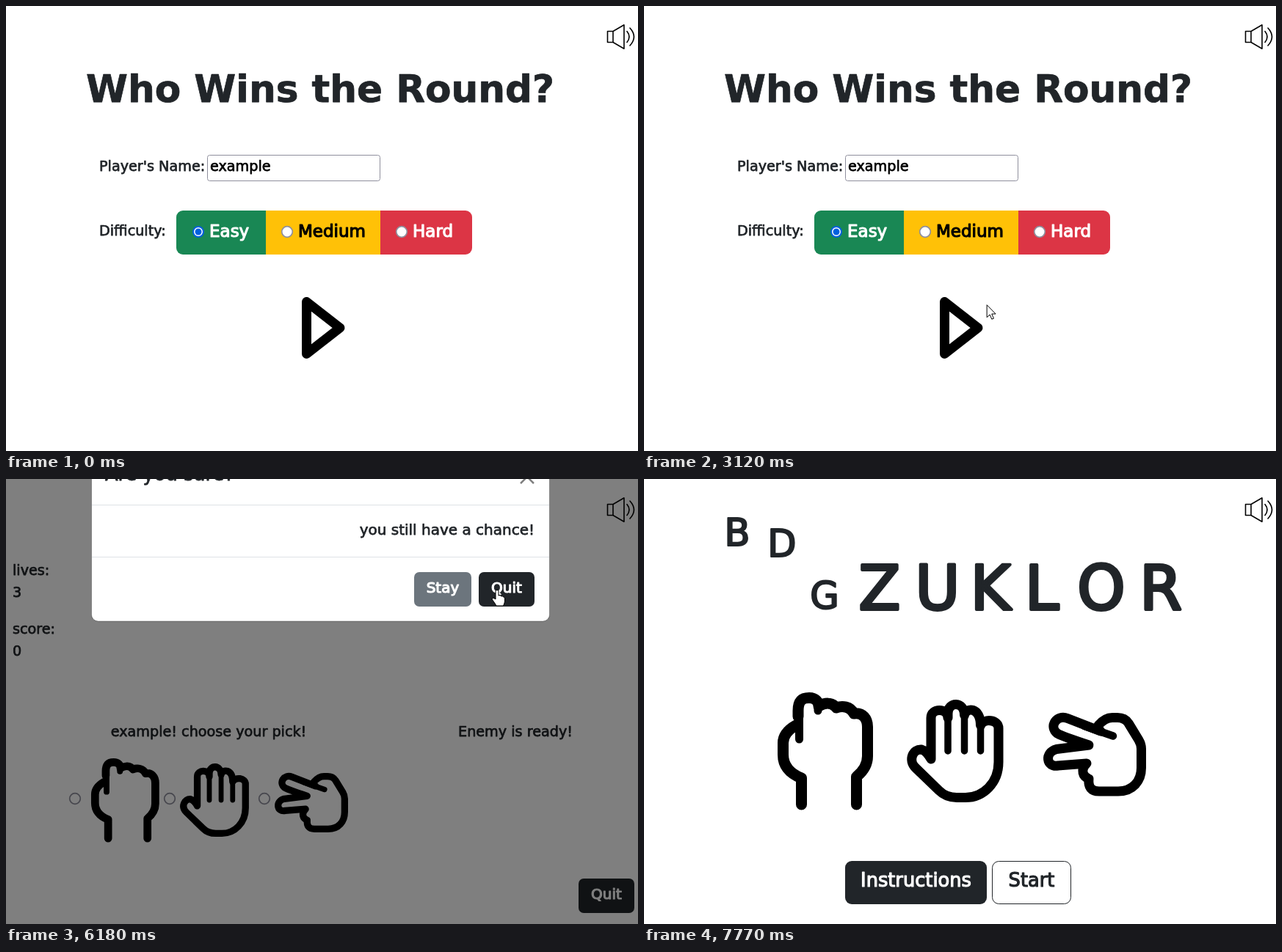
Write an HTML page that moves like this. It is 861x607 px and loops after 7.84 s.

```html
<!DOCTYPE html>
<html lang="en">
<head>
<meta charset="utf-8">
<title>Hand game</title>
<style>
  html, body { margin: 0; height: 100%; overflow: hidden; background: #fff; }
  svg { display: block; width: 861px; height: 607px; }
  text {
    font: 19.2px "DejaVu Sans", sans-serif; fill: currentColor; stroke: currentColor;
    stroke-width: .75; stroke-linejoin: round; color: #212529;
  }
  .mid { text-anchor: middle; }
  .end { text-anchor: end; }
  .title { font-size: 51.7px; font-weight: bold; }
  .label { font-size: 23px; stroke-width: 1.2; }
  .wide { font-size: 25.7px; stroke-width: 1.2; }
  .heading { font-size: 25.7px; }
  .bold { font-size: 20px; stroke-width: 1.2; }
  .small { font-size: 51px; stroke-width: 2.2; }
  .big { font-size: 83px; stroke-width: 4; }
  .light { color: #fff; }
  .ui { font: 14px "Open Sans", sans-serif; stroke-width: 0; color: #fbfbfe; }
  .line { fill: none; stroke: #000; stroke-linecap: round; stroke-linejoin: round; }
  .radio { fill: #fff; stroke: #8f8f9d; stroke-width: 1.7; }
</style>
</head>
<body>
<svg viewBox="0 0 861 607">
  <defs>
    <g id="fist" class="line" stroke-width="15">
      <path d="M214.5 444V408Q189.5 398 189.5 376V360Q189.5 346 207 336"/>
      <path stroke-width="11" d="M211.5 355V325M237 316V306"/>
      <path d="M210 324V316C210 303 215 298.5 225 298.5C234 298.5 238 304 238 310C246 305 256 304 262 312C270 309 281 310 286 320C298 318 304.5 327 304.5 338V378Q304.5 394 289.5 406V444"/>
    </g>
    <g id="palm" class="line" stroke-width="13">
      <path stroke-width="9.5" d="M414 324V371M436.5 322V371M458.5 330V371"/>
      <path d="M391 382V326C391 312 414 312 414 326V320C414 303 436.5 303 436.5 322C439 311 458.5 311 458.5 336C463 326 483 328 483 340V386C483 415 462 434.5 438 434.5H426C416 434.5 409 432 402 425L370 394C359 383 367 368 378 369Q385 371 391 382Z"/>
    </g>
    <g id="scissors" class="line" stroke-width="13">
      <path stroke-width="10.5" d="M639 350.5L600 337"/>
      <path d="M622 344L577 326.5C562 320.5 551 338 563 347Q567 350 606 363L562 368.5C545 373 548 394 564 391L603 388C594 397 598 406 606 409C605 420 609 426 620 426H646C666 426 677.5 412 677.5 394V368Q677.5 362 674 356L660 333Q655 325.5 645 325.5H638Q628 325.5 619 336"/>
    </g>
    <filter id="shadow" x="-10%" y="-20%" width="120%" height="150%">
      <feDropShadow dx="0" dy="2" stdDeviation="7" flood-opacity=".3"/>
    </filter>
    <clipPath id="group"><rect x="232" y="279" width="403" height="60" rx="9"/></clipPath>
  </defs>

  <g id="setup">
    <text class="title mid" x="428" y="131">Who Wins the Round?</text>
    <text x="127" y="225">Player's Name:</text>
    <rect x="274.5" y="203.5" width="235" height="35" rx="3" fill="#fff" stroke="#8f8f9d"/>
    <text x="278" y="225" style="color:#000">example</text>
    <text x="127" y="313">Difficulty:</text>
    <g clip-path="url(#group)">
      <rect id="easy" x="232" y="279" width="122" height="60"/>
      <rect id="medium" x="354" y="279" width="156" height="60"/>
      <rect id="hard" x="510" y="279" width="125" height="60"/>
    </g>
    <circle cx="262" cy="308" r="7" fill="#fff" stroke="#0060df" stroke-width="2"/>
    <circle cx="262" cy="308" r="4.5" fill="#0060df"/>
    <circle class="radio" cx="383" cy="308" r="7.3"/>
    <circle class="radio" cx="539" cy="308" r="7.3"/>
    <text class="label light" x="277" y="315">Easy</text>
    <text class="label" x="398" y="315" style="color:#000">Medium</text>
    <text class="label light" x="554" y="315">Hard</text>
    <path class="line" stroke-width="13" d="M409.5 403.5V474.5L455 439Z"/>
  </g>

  <g id="game">
    <text x="9" y="131">lives:</text>
    <text x="9" y="161">3</text>
    <text x="9" y="211">score:</text>
    <text x="9" y="241">0</text>
    <text class="mid" x="276" y="351">example! choose your pick!</text>
    <text class="mid" x="694" y="351">Enemy is ready!</text>
    <circle class="radio" cx="94" cy="436" r="7.3"/>
    <circle class="radio" cx="223" cy="436" r="7.3"/>
    <circle id="pick" class="radio" cx="352" cy="436" r="7.3"/>
    <use href="#fist" transform="translate(-14 173.2) scale(.714)"/>
    <use href="#palm" transform="translate(-18.6 173.2) scale(.714)"/>
    <use href="#scissors" transform="translate(-22.4 173.2) scale(.714)"/>
    <rect id="quit" x="780" y="545" width="76" height="47" rx="7"/>
    <text class="bold light mid" x="818" y="573">Quit</text>
  </g>

  <g id="home">
    <g id="letters">
      <text class="small mid" x="127" y="177">B</text>
      <text class="small mid" x="188" y="177">D</text>
      <text class="small mid" x="246" y="177">G</text>
    </g>
    <g id="word"></g>
    <use href="#fist"/><use href="#palm"/><use href="#scissors"/>
    <rect x="274" y="521" width="193" height="59" rx="9" fill="#212529"/>
    <text class="wide light mid" x="370.5" y="556">Instructions</text>
    <rect x="474.5" y="521.5" width="107" height="58" rx="9" fill="#fff" stroke="#212529"/>
    <text class="wide mid" x="528" y="556">Start</text>
  </g>

  <g class="line" stroke-width="1.6">
    <path d="M819.5 34.5H827V49.5H819.5ZM827 34.5L842 25.8V58.2L827 49.5"/>
    <path d="M846 34.5Q852 42 846 49.5M850 30Q861 42 850 54"/>
  </g>

  <rect id="shade" width="861" height="607"/>

  <g id="alert">
    <rect x="173" y="296" width="510" height="164" rx="9" fill="#42414d" filter="url(#shadow)"/>
    <g fill="none" stroke="#fbfbfe" stroke-width="1.7">
      <circle cx="203.5" cy="326.5" r="8.6"/>
      <ellipse cx="203.5" cy="326.5" rx="4" ry="8.6"/>
      <path d="M195 326.5H212"/>
    </g>
    <text class="ui" x="218" y="332" style="font-weight:600">file://</text>
    <text class="ui" x="193" y="376">choose difficulty</text>
    <rect id="ok" x="604" y="400" width="59" height="40" rx="4"/>
    <text class="ui mid" x="633" y="426" style="color:#2b2a33">OK</text>
  </g>

  <g id="modal">
    <rect x="116.5" y="-43" width="624" height="237" rx="9" fill="#fff" stroke="#000" stroke-opacity=".3"/>
    <path d="M117 35.5H740M117 106.5H740" stroke="#dee2e6"/>
    <text class="heading" x="135" y="2">Are you sure?</text>
    <path d="M701-12L719 6M719-12L701 6" stroke="#808080" stroke-width="2.5"/>
    <text class="end" x="720" y="76" style="font-size:20px">you still have a chance!</text>
    <rect x="556" y="127" width="78" height="47" rx="7" fill="#6c757d"/>
    <text class="bold light mid" x="595" y="155">Stay</text>
    <rect id="leave" x="644" y="127" width="76" height="47" rx="7"/>
    <text class="bold light mid" x="682" y="155">Quit</text>
  </g>

  <g id="cursor">
    <circle id="click" cy="-1" r="15" fill="#ff0" fill-opacity=".52"/>
    <path id="arrow" fill="#fff" stroke="#000" d="M0 0V17L4 13.3 6.7 19.5 9.3 18.4 6.6 12.3H12Z"/>
    <path id="hand" fill="#fff" stroke="#000" d="M-2 13V1.5Q0-1 2 1.5V8Q5 6.5 5.5 9Q8 8 8.5 10Q10.5 9.5 10.5 12V16Q10 19 8.5 22H-1Q-3 18-7 13Q-6 10-2 13Z"/>
  </g>
</svg>
<script>
const LOOP = 7840;
const $ = id => document.getElementById(id);
const clamp = v => Math.min(1, Math.max(0, v));
const easeOut = v => 1 - (1 - clamp(v)) ** 2;
const within = (v, a, b) => v >= a && v < b;
const show = (id, on) => $(id).style.display = on ? '' : 'none';
const fill = (id, color) => $(id).setAttribute('fill', color);
const move = (el, x, y) => el.setAttribute('transform', `translate(${x} ${y})`);

// Linear interpolation through rows of [time, ...values]
function track(rows, t) {
  const i = rows.findIndex(r => r[0] > t);
  if (i < 1) return (i ? rows[rows.length - 1] : rows[0]).slice(1);
  const a = rows[i - 1], b = rows[i], k = (t - a[0]) / (b[0] - a[0]);
  return a.slice(1).map((v, j) => v + (b[j + 1] - v) * k);
}

const pointer = [
  [190, 380, 314], [330, 500, 345], [460, 527, 440], [560, 490, 488], [660, 413, 443],
  [1390, 413, 443], [1850, 629, 427], [2190, 629, 427], [2500, 430, 330], [2620, 310, 318],
  [2700, 310, 318], [2860, 375, 318], [2930, 400, 322], [3060, 515, 350], [3190, 413, 473],
  [4720, 413, 473], [5170, 818, 566], [5250, 818, 586], [5510, 818, 586], [6120, 669, 151]
];
const hop = [[0, 0], [35, 0], [55, 20], [95, 71], [180, 80], [220, 86], [330, 112], [510, 0], [1020, 0]];
const clicks = [930, 2120, 2640, 3520, 5250, 6310];

const centres = [321, 400, 472, 542, 623, 704];
$('word').innerHTML = [...'ZUKLOR'].map((c, i) =>
  `<text class="big mid" x="${centres[i]}" y="177.5">${c}</text>`).join('');

function draw(t) {
  const setup = t < 3520, home = t >= 6340, game = !setup && !home;
  show('setup', setup);
  show('game', game);
  show('home', home);

  const [x, y] = track(pointer, t);
  const over = (l, top, r, b) => t >= 190 && within(x, l, r) && within(y, top, b);
  const asking = within(t, 930, 2190);

  const onEasy = !asking && over(232, 279, 354, 339);
  const onMedium = !asking && over(354, 279, 510, 339);
  const onHard = !asking && over(510, 279, 635, 339);
  const onPlay = setup && !asking && over(400, 395, 465, 485);
  const onQuit = game && t < 5320 && over(780, 545, 856, 592);
  const onLeave = within(t, 5740, 6400) && over(644, 127, 720, 174);
  fill('easy', onEasy ? '#157347' : '#198754');
  fill('medium', onMedium ? '#ffca2c' : '#ffc107');
  fill('hard', onHard ? '#bb2d3b' : '#dc3545');
  fill('quit', onQuit ? '#424649' : '#212529');
  fill('leave', onLeave && t > 6210 ? '#424649' : '#212529');
  fill('ok', t >= 2120 ? '#aaf2ff' : over(604, 400, 663, 440) ? '#80ebff' : '#00ddff');
  $('pick').style.stroke = over(366, 400, 466, 484) ? '#5b5b66' : '#8f8f9d';

  const alertIn = asking ? clamp((t - 900) / 230) : 0;
  $('alert').setAttribute('opacity', alertIn);
  const dim = Math.min(clamp((t - 5290) / 150), clamp((6790 - t) / 150));
  fill('shade', asking ? '#1c1b22' : '#000');
  $('shade').setAttribute('opacity', asking ? .45 * alertIn : .5 * dim);

  const open = Math.min(easeOut((t - 5440) / 300), 1 - easeOut((t - 6340) / 300));
  $('modal').setAttribute('opacity', open);
  move($('modal'), 0, -62.5 * (1 - open));

  [...$('letters').children].forEach((el, i) => {
    const phase = Math.max(0, t - 6530 - 125 * i) % 1020;
    move(el, 0, -track(hop, phase)[0]);
  });

  const pointing = setup
    ? onEasy || onMedium || onHard || onPlay
    : onQuit || onLeave;
  show('cursor', within(t, 190, 7110));
  show('hand', pointing);
  show('arrow', !pointing);
  show('click', clicks.some(c => within(t, c, c + 70)));
  move($('cursor'), x, y);
}

function tick() {
  draw(performance.now() % LOOP);
  requestAnimationFrame(tick);
}
tick();
</script>
</body>
</html>
```
